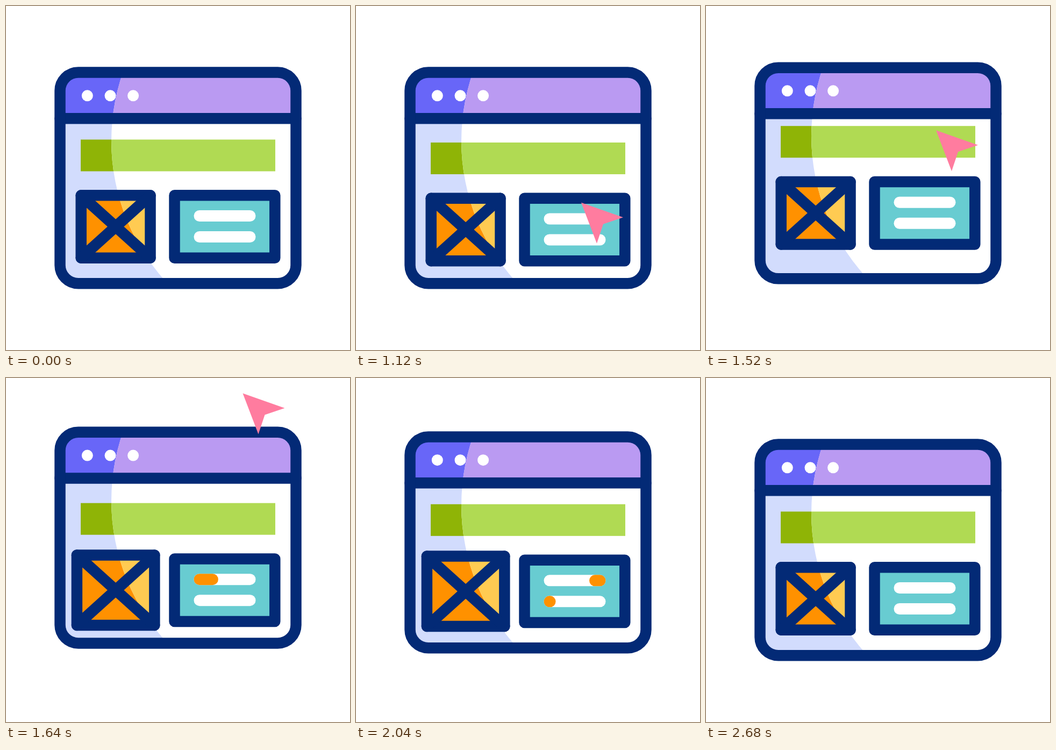
Animation, 640 px wide and 640 px high, one loop 2880 ms. Source, as an HTML page with a canvas:

```html
<!DOCTYPE html>
<html lang="en">
<head>
<meta charset="utf-8">
<title>Page layout</title>
<style>
  html, body { margin: 0; width: 100%; height: 100%; overflow: hidden; background: #fff; }
  canvas { display: block; }
</style>
</head>
<body>
<canvas id="stage" width="640" height="640"></canvas>
<script>
const ctx = document.getElementById('stage').getContext('2d');
const LOOP = 2880, STEP = 40, STROKE = 20.5, NAVY = '#032a76';
const SHADE = { header: '#6866f8', page: '#d2dcfd', banner: '#8fb406', image: '#ff9100' };
const LIGHT = { header: '#ba9af2', page: '#ffffff', banner: '#b0da53', image: '#ffcb52' };

const ease = u => u * u * (3 - 2 * u);

// Eased value between [time, value] keys, held at both ends
function track(t, ...keys) {
  if (t <= keys[0][0]) return keys[0][1];
  for (let i = 1; i < keys.length; i++) {
    const [t0, a] = keys[i - 1], [t1, b] = keys[i];
    if (t < t1) return a + (b - a) * ease((t - t0) / (t1 - t0));
  }
  return keys[keys.length - 1][1];
}

function fill(color, x, y, w, h) {
  ctx.fillStyle = color;
  ctx.fillRect(x, y, w, h);
}

function line(color, width, x1, y1, x2, y2) {
  ctx.strokeStyle = color;
  ctx.lineWidth = width;
  ctx.beginPath();
  ctx.moveTo(x1, y1);
  ctx.lineTo(x2, y2);
  ctx.stroke();
}

function frame(x, y, w, h) {
  ctx.strokeStyle = NAVY;
  ctx.lineWidth = STROKE;
  ctx.strokeRect(x, y, w, h);
}

function windowPath() {
  ctx.beginPath();
  ctx.roundRect(100.5, 123.6, 439, 392.7, 34);
}

function fills(colors, scroll, w, h) {
  fill(colors.page, 100, 123, 440, 394);
  fill(colors.header, 100, 123, 440, 86);
  fill(colors.banner, 139, 248.5 + scroll, 362, 59);
  fill(colors.image, 204.1 - w, 410.5 + scroll - h, 2 * w, 2 * h);
}

function textLine(t, y, start) {
  line('#fff', 21, 360, y, 454, y);
  const head = track(t, [start, 360], [start + 351, 454]);
  const tail = track(t, [start + 235, 360], [start + 586, 454]);
  if (head > tail) line('#ff9100', 21, tail, y, head, y);
}

function drawWindow(t) {
  const lift = track(t, [1388, 0], [1740, -28.3], [2340, 0]);
  const scroll = track(t, [1010, 0], [1300, 17], [1540, -17], [1760, 38.4], [2060, 0]);
  const scale = track(t, [1540, 1], [1740, 1.243], [2340, 1]);
  const w = 64.4 * scale, h = 58.2 * scale;

  ctx.save();
  ctx.translate(0, lift);

  ctx.save();
  windowPath();
  ctx.clip();
  fills(SHADE, scroll, w, h);
  ctx.save();
  ctx.beginPath();
  ctx.arc(584.5, 251, 388.5, 0, 2 * Math.PI);
  ctx.clip();
  fills(LIGHT, scroll, w, h);
  ctx.restore();

  ctx.translate(0, scroll);
  const left = 204.1 - w, right = 204.1 + w, top = 410.5 - h, bottom = 410.5 + h;
  frame(left, top, 2 * w, 2 * h);
  line(NAVY, STROKE, left, top, right, bottom);
  line(NAVY, STROKE, left, bottom, right, top);
  fill('#68ccd1', 313.5, 352.3, 186.8, 116.4);
  frame(313.5, 352.3, 186.8, 116.4);
  textLine(t, 390.5, 1523);
  textLine(t, 429.5, 2018);
  ctx.restore();

  line(NAVY, STROKE, 100.5, 209.3, 539.5, 209.3);
  windowPath();
  ctx.lineWidth = STROKE;
  ctx.stroke();
  for (const x of [151.3, 194, 236.6]) line('#fff', 21, x, 166.8, x, 166.8);
  ctx.restore();
}

function drawCursor(t) {
  const flick = (Math.max(0, t - 1300) / 220) ** 2;
  const x = track(t, [480, 660], [1013, 419]) + 9 * flick;
  const y = track(t, [480, 394.5], [1013, 360.3]) + track(t, [1010, 0], [1300, 17]) - 146 * flick;
  ctx.fillStyle = '#ff7c9f';
  ctx.beginPath();
  for (const [dx, dy] of [[0, 0], [78, 27.5], [41, 40], [29, 76]]) ctx.lineTo(x + dx, y + dy);
  ctx.fill();
}

function draw(now) {
  const t = Math.floor((now % LOOP) / STEP) * STEP;
  fill('#fff', 0, 0, 640, 640);
  drawWindow(t);
  drawCursor(t);
  requestAnimationFrame(draw);
}

ctx.lineCap = ctx.lineJoin = 'round';
draw(0);
</script>
</body>
</html>
```
